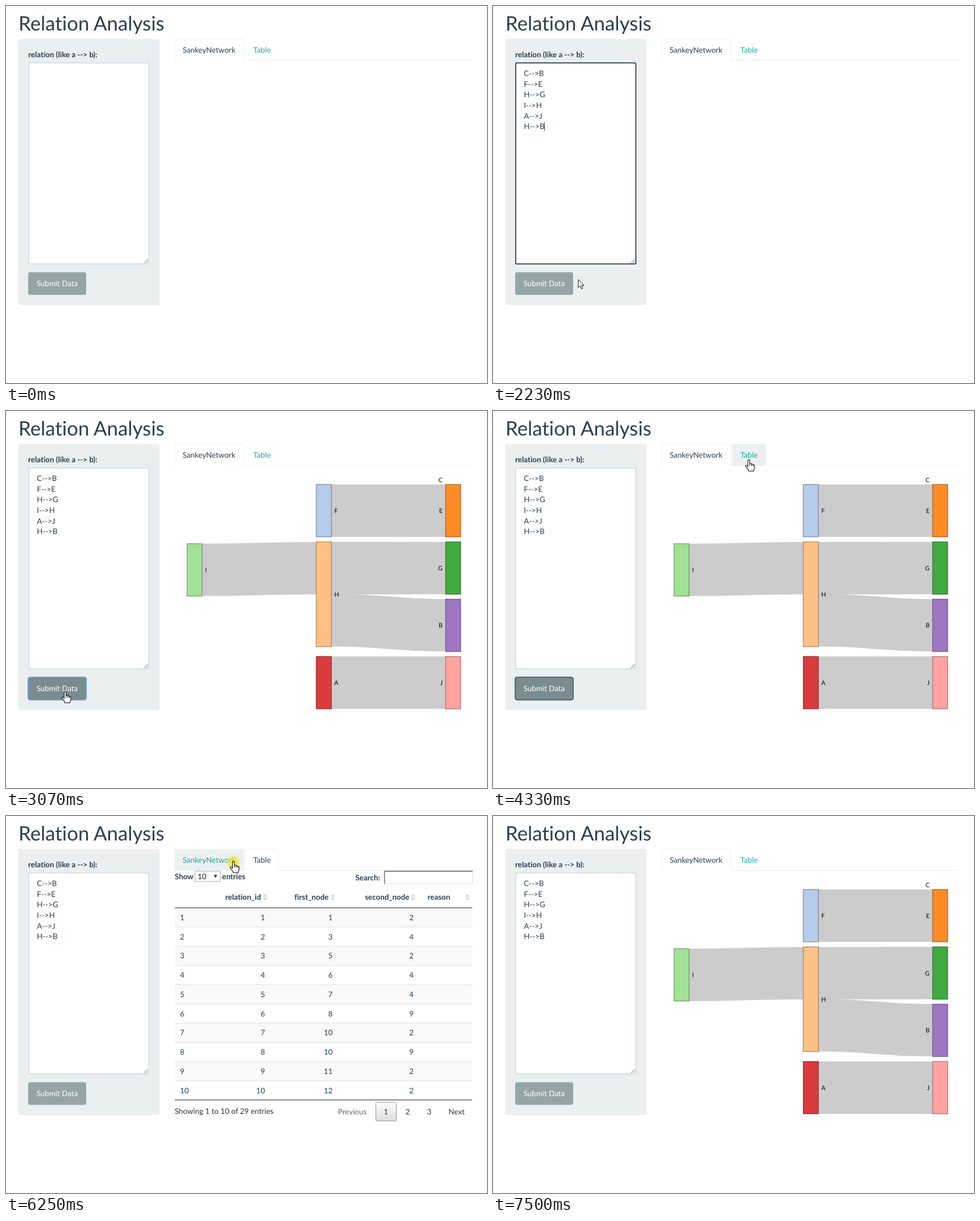
An HTML page for the animation above (8 s loop, 846x662 px).

```html
<!DOCTYPE html>
<html lang="en">
<head>
<meta charset="utf-8">
<title>Relation Analysis</title>
<style>
  html, body { margin: 0; width: 100%; height: 100%; overflow: hidden; background: #fff; }
  svg {
    display: block; width: 100vw; height: 100vh; fill: #2c3e50;
    font: 13.38px Lato, sans-serif; font-variant-ligatures: none; text-rendering: geometricPrecision;
  }
  .bold { font-weight: 700; }
  .end { text-anchor: end; }
  .mid { text-anchor: middle; }
  .line { fill: none; stroke: #ecf0f1; stroke-width: 1; }
  .link { fill: none; stroke: #000; stroke-opacity: .2; stroke-width: 92; }
  .node { fill-opacity: .9; stroke-opacity: .9; stroke-width: .9; }
  #sankey text { font-size: 10.67px; fill: #000; }
</style>
</head>
<body>
<svg viewBox="0 0 846 662">
  <defs>
    <linearGradient id="pageFill" x2="0" y2="1">
      <stop stop-color="#fff"/><stop offset="1" stop-color="#dcdcdc"/>
    </linearGradient>
  </defs>

  <text x="22" y="42.5" font-size="34.8">Relation Analysis</text>

  <rect x="21.5" y="58" width="248.5" height="467" rx="3.5" fill="#ebefef"/>
  <text class="bold" x="39" y="89.5">relation (like a --&gt; b):</text>
  <rect id="area" x="39.9" y="99.9" width="211.4" height="353" rx="2.5" fill="#fff" stroke-width="1.8"/>
  <path d="M242.5 451.5l7-7M246.5 451.5l3-3" stroke="#666" stroke-width="1"/>
  <g id="relations"></g>
  <path id="caret" stroke="#2c3e50" stroke-width="1"/>
  <rect id="button" x="39" y="467.5" width="102" height="39.7" rx="3.5" stroke-width="2"/>
  <text class="mid" x="90" y="492" fill="#fff">Submit Data</text>

  <rect id="hover" y="58" height="37.5" rx="3.5" fill="#ecf0f1"/>
  <path id="tabs" class="line"/>
  <text id="tabSankey" x="310.7" y="81.5">SankeyNetwork</text>
  <text id="tabTable" x="435" y="81.5">Table</text>

  <g id="sankey"></g>

  <g id="table">
    <text class="bold" x="296.7" y="111">Show</text>
    <rect x="332.5" y="97" width="44.5" height="18" fill="#fff" stroke="#a9a9a9"/>
    <text x="337" y="111" fill="#222">10</text>
    <path d="M365.5 103.5h6l-3 5z" fill="#222"/>
    <text class="bold" x="380" y="111">entries</text>
    <text class="bold end" x="658" y="112.5">Search:</text>
    <path d="M665.8 119.5V97H821" fill="none" stroke="#858585" stroke-width="1.8"/>
    <path d="M665.5 119H820.5V97" fill="none" stroke="#ddd"/>
    <g id="rows"></g>
    <path d="M297 161.2H820M297 498.6H820" stroke="#222" stroke-width="1"/>
    <text x="296.7" y="523" fill="#333">Showing 1 to 10 of 29 entries</text>
    <rect x="650.5" y="502.5" width="36" height="33" rx="1.8" fill="url(#pageFill)" stroke="#979797"/>
    <g class="mid" fill="#333">
      <text x="609" y="524" fill="#666">Previous</text>
      <text x="668.5" y="524">1</text>
      <text x="706.5" y="524">2</text>
      <text x="744.5" y="524">3</text>
      <text x="792.5" y="524">Next</text>
    </g>
  </g>

  <g id="pointer">
    <circle id="click" r="10.5" fill="#f5e616" fill-opacity=".65"/>
    <path id="arrow" d="M0 0V14.5L3.4 11.4 5.8 16.8 8 15.8 5.7 10.5H10Z" fill="#fff" stroke="#111" stroke-width="1"/>
    <path id="beam" d="M-3.5 -7.5H-1Q0 -7.5 0 -6.5Q0 -7.5 1 -7.5H3.5M0 -6.5V6.5M-3.5 7.5H-1Q0 7.5 0 6.5Q0 7.5 1 7.5H3.5" fill="none" stroke="#111" stroke-width="1.1"/>
    <g id="hand" stroke="#111" stroke-width="1.1" stroke-linejoin="round">
      <path d="M-1.6 11V0Q-1.6 -1.4 0 -1.4T1.6 0V5.5Q4.6 4.6 4.8 6.6Q7.4 5.8 7.7 7.6Q10 7 10 9.4V12.5Q10 14.6 8.5 16.5V18.5H-.5V16.8L-5.4 10.6Q-6.3 8.6 -4.6 8.3Q-3.2 8.3 -1.6 11Z" fill="#fff"/>
      <path d="M1.6 5.5V9M4.8 6.6V9.5M7.7 7.6V10" fill="none"/>
    </g>
  </g>
</svg>

<script>
const LOOP = 8000;
const $ = id => document.getElementById(id);

function add(parent, tag, attrs, text = '') {
  const el = document.createElementNS('http://www.w3.org/2000/svg', tag);
  for (const name in attrs) el.setAttribute(name, attrs[name]);
  el.textContent = text;
  parent.appendChild(el);
}

function set(id, attrs) {
  for (const name in attrs) $(id).setAttribute(name, attrs[name]);
}

const show = (id, visible) => set(id, { visibility: visible ? 'visible' : 'hidden' });

function buildRelations() {
  ['C-->B', 'F-->E', 'H-->G', 'I-->H', 'A-->J', 'H-->B'].forEach((relation, i) =>
    add($('relations'), 'text', { x: 54.2, y: 123 + i * 18.67 }, relation));
}

function buildSankey() {
  const left = 318.3, center = 545.7, right = 773.2, width = 26.6, unit = 92;
  const link = (x0, y0, x1, y1) => {
    const start = x0 + width, bend = (start + x1) / 2;
    y0 += unit / 2;
    y1 += unit / 2;
    add($('sankey'), 'path', { class: 'link', d: `M${start} ${y0}C${bend} ${y0} ${bend} ${y1} ${x1} ${y1}` });
  };
  const darker = hex => '#' + hex.match(/../g)
    .map(c => Math.round(parseInt(c, 16) * .49).toString(16).padStart(2, '0')).join('');
  const node = (name, x, y, color, units = 1) => {
    const height = unit * units;
    if (units) add($('sankey'), 'rect',
      { class: 'node', x, y, width, height, fill: '#' + color, stroke: darker(color) });
    add($('sankey'), 'text', {
      class: x === right ? 'end' : '',
      x: x === right ? x - 5.3 : x + width + 5.3,
      y: y + height / 2 + 3.8
    }, name);
  };
  link(center, 129, right, 129);
  link(left, 233, center, 230);
  link(center, 230, right, 229.8);
  link(center, 321.6, right, 330.2);
  link(center, 431, right, 431);
  node('I', left, 233, '98df8a');
  node('F', center, 129, 'aec7e8');
  node('H', center, 229.8, 'ffbb78', 2);
  node('A', center, 431, 'd62728');
  node('C', right, 120.7, 'ffffff', 0);
  node('E', right, 129, 'ff7f0e');
  node('G', right, 229.8, '2ca02c');
  node('B', right, 330.3, '9467bd');
  node('J', right, 431, 'ff9896');
}

function buildTable() {
  const rows = $('rows'), step = 33.75;
  const header = (name, x, arrowX, cls = 'bold end') => {
    add(rows, 'text', { class: cls, x, y: 147.3 }, name);
    add(rows, 'path', {
      d: `M${arrowX - 3.8} 141.8h7.6l-3.8 -5zM${arrowX - 3.8} 143.8h7.6l-3.8 5z`, fill: '#d5d5d5'
    });
  };
  header('relation_id', 448.5, 455.5);
  header('first_node', 567.5, 574.5);
  header('second_node', 709.5, 716.5);
  header('reason', 741.5, 811.5, 'bold');

  const first = [1, 3, 5, 6, 7, 8, 10, 10, 11, 12];
  const second = [2, 4, 2, 4, 4, 9, 2, 9, 2, 2];
  first.forEach((value, i) => {
    const top = 161.2 + i * step, y = top + 21.6, id = i + 1;
    if (i % 2 === 0) add(rows, 'rect', { x: 297, y: top, width: 523, height: step, fill: '#f9f9f9' });
    if (i) add(rows, 'path', { d: `M297 ${top}H820`, stroke: '#ddd', 'stroke-width': .9 });
    add(rows, 'text', { x: 306, y }, id);
    [[455.5, id], [574.5, value], [717, second[i]]].forEach(([x, text]) =>
      add(rows, 'text', { class: 'end', x, y }, text));
  });
}

// Pointer stops: time, x, y, shape; the pointer jumps from stop to stop.
const stops = [
  [0, 0, 0, ''],
  [140, 717, 645, 'arrow'], [300, 560, 520, 'arrow'], [460, 370, 370, 'arrow'],
  [610, 215, 265, 'beam'], [770, 183, 244, 'beam'],
  [1830, 188, 290, 'beam'], [1980, 174, 385, 'beam'], [2120, 150, 480, 'arrow'],
  [2270, 130, 549, 'arrow'], [2410, 112, 516, 'arrow'], [2560, 104, 494, 'hand'],
  [3700, 150, 430, 'beam'], [3820, 228, 330, 'beam'], [3950, 320, 215, 'arrow'],
  [4080, 400, 135, 'arrow'], [4200, 440, 98, 'arrow'], [4330, 450, 87, 'hand'],
  [4780, 449, 86, 'arrow'], [5550, 439, 84, 'arrow'], [5700, 412, 82, 'hand'],
  [5860, 400, 81, 'hand'], [6330, 400, 81, 'arrow'],
  [6940, 490, 170, 'arrow'], [7080, 580, 330, 'arrow'], [7220, 370, 490, 'arrow'],
  [7360, 115, 553, 'arrow'], [7500, 0, 0, '']
];
const clicks = [[770, 920], [2700, 2850], [4630, 4780], [6250, 6330]];

function draw(t) {
  const within = (from, to) => t >= from && t < to;
  const typed = t >= 1220;
  const areaFocus = within(770, 2700);
  const buttonFocus = within(2700, 4780);
  const buttonHover = within(2560, 3700);
  const onTable = within(4780, 6330);

  show('relations', typed);
  set('area', { stroke: areaFocus ? '#2c3e50' : '#d5dee5' });
  show('caret', areaFocus);
  set('caret', { d: typed ? 'M90.5 204V219.5' : 'M54.5 110.5V126' });
  set('button', {
    fill: buttonFocus || buttonHover ? '#798d8f' : '#95a5a6',
    stroke: !buttonFocus ? 'none' : buttonHover ? '#6f9be0' : '#476795'
  });

  const [x0, x1] = onTable ? [420.5, 479.5] : [297.2, 418.2];
  set('tabs', { d: `M297 95.5H${x0}V61.5q0 -3.5 3.5 -3.5H${x1 - 3.5}q3.5 0 3.5 3.5V95.5H821` });
  set('tabSankey', { fill: onTable ? '#18a999' : '#2c3e50' });
  set('tabTable', { fill: onTable ? '#2c3e50' : '#18a999' });
  show('hover', within(4330, 4780) || within(5700, 6330));
  set('hover', onTable ? { x: 297, width: 121.5 } : { x: 420.5, width: 59.5 });

  show('sankey', t >= 3070 && !onTable);
  show('table', onTable);

  const [, x, y, shape] = stops.findLast(stop => stop[0] <= t);
  set('pointer', { transform: `translate(${x} ${y})` });
  ['arrow', 'beam', 'hand'].forEach(id => show(id, id === shape));
  show('click', clicks.some(([from, to]) => within(from, to)));
}

buildRelations();
buildSankey();
buildTable();

const start = performance.now();
function tick() {
  draw((performance.now() - start) % LOOP);
  requestAnimationFrame(tick);
}
tick();
</script>
</body>
</html>
```
